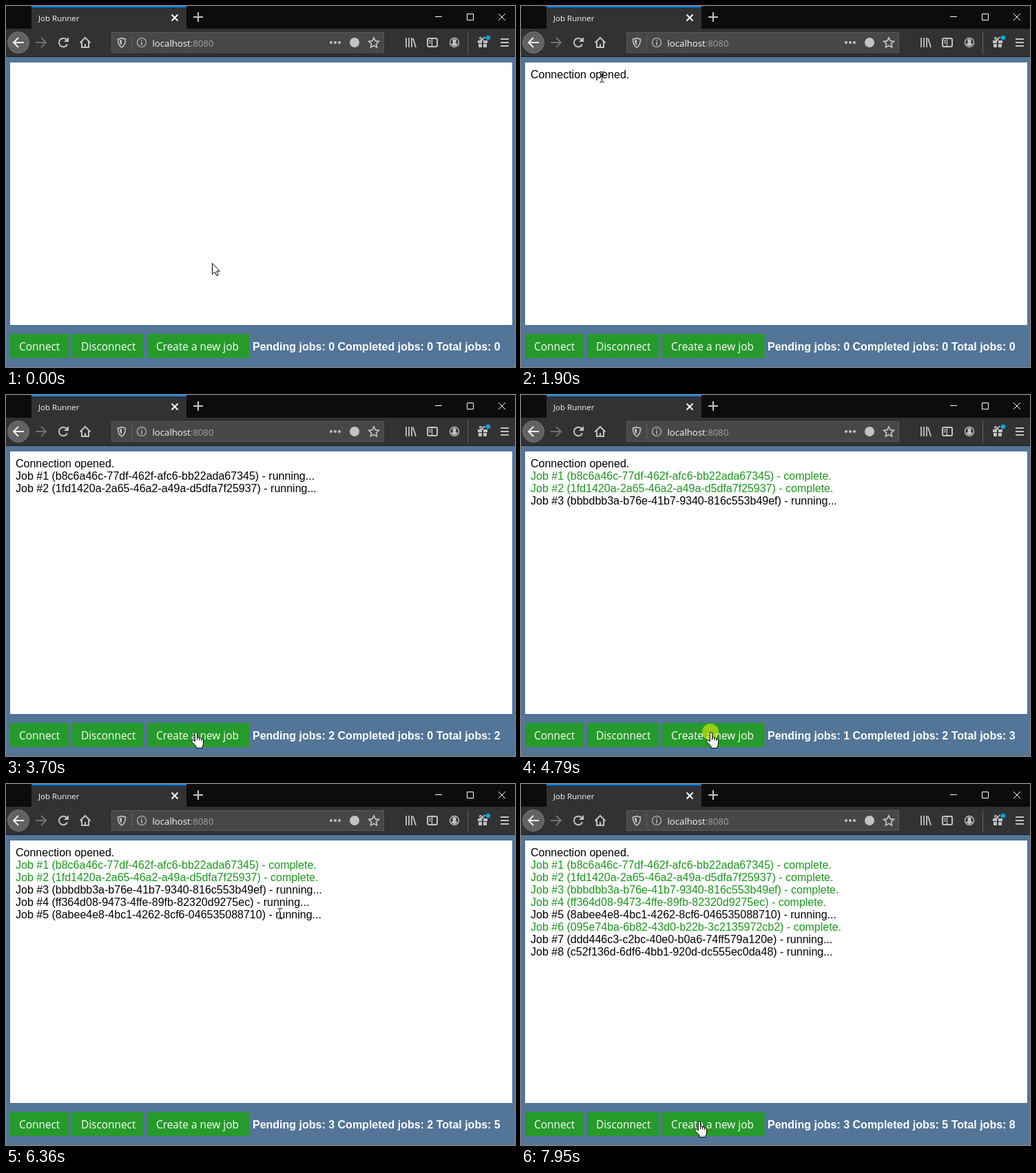
An HTML page for the animation above (8000 ms loop, 739 by 524 pixels).

```html
<!DOCTYPE html>
<html lang="en">
<head>
<meta charset="utf-8">
<title>Job Runner</title>
<style>
html, body { margin: 0; width: 100%; height: 100%; overflow: hidden; background: #537597; }
svg { display: block; }
text { white-space: pre; }
.ui { font-family: "Open Sans", "Noto Sans", sans-serif; fill: #f9f9fa; }
.page { font: 16px "Liberation Sans", Arial, sans-serif; }
.done { fill: #1a981c; }
.stats { font-weight: bold; fill: #fff; }
.buttons rect { fill: #269a2b; }
.buttons text { font-size: 15.4px; fill: #fff; }
.icons { fill: none; stroke: #c3c3c5; stroke-width: 2; }
.thin { stroke-width: 1; stroke: #fff; }
.solid { fill: #c3c3c5; stroke: none; }
#arrow path, #hand path { fill: #fff; stroke: #000; }
#beam { mix-blend-mode: difference; fill: none; stroke: #fff; }
</style>
</head>
<body>
<svg width="739" height="524" viewBox="0 0 739 524">
  <rect width="739" height="524" fill="#537597"/>
  <rect width="739" height="33" fill="#0c0c0d"/>
  <rect y="33" width="739" height="40" fill="#323234"/>
  <rect y="73" width="739" height="1" fill="#18181a"/>
  <rect x="37" width="225" height="33" fill="#323234"/>
  <rect x="37" width="225" height="2" fill="#0a84ff"/>
  <rect x="153.500" y="38.500" width="395" height="29" fill="#474749" stroke="#59595b"/>
  <circle cx="18" cy="53" r="15.500" fill="#626264" stroke="#747476"/>
  <text class="ui" x="47" y="22" font-size="11.5">Job Runner</text>
  <text class="ui" x="212.500" y="59" font-size="13.2">localhost<tspan fill="#a3a3a5">:8080</tspan></text>

  <g class="icons">
    <path d="M240.500 12.500l9 9m0-9l-9 9" stroke="#f9f9fa"/>
    <path d="M272 16h14M279 9v14"/>
    <path class="thin" d="M623 15.500h10M669.500 11.500h9v9h-9zM715 11l10 10m0-10l-10 10"/>
    <path d="M26 53H11m7-7l-7 7 7 7" stroke="#f0f0f1"/>
    <path d="M43 53h15m-7-7l7 7-7 7" stroke="#727274"/>
    <path d="M88.500 49.500A6.300 6.300 0 1 0 89 55.500"/>
    <path class="solid" d="M91 45v7h-7z"/>
    <path d="M107.500 53.500l7.500-7.500 7.500 7.500M110 52v8h10v-8M115 60v-5"/>
    <path d="M168 46.500q3 1.500 5.500 1.500 0 9-5.500 12-5.500-3-5.500-12 2.500 0 5.500-1.500z" stroke-width="1.600"/>
    <path class="solid" d="M168 49v8q-3-2-3-7z"/>
    <path d="M182.500 42v22M670.500 37v33" stroke="#5f5f61" stroke-width="1"/>
    <circle cx="197" cy="53" r="6.500" stroke-width="1.200"/>
    <path d="M197 52v5M197 49v1.500" stroke-width="1.500"/>
    <g class="solid">
      <circle cx="472" cy="53" r="2"/><circle cx="478" cy="53" r="2"/><circle cx="484" cy="53" r="2"/>
      <circle cx="506" cy="53" r="7"/>
    </g>
    <path d="M534 46l2.200 4.700 5.100.6-3.800 3.500 1 5.100-4.500-2.500-4.500 2.500 1-5.100-3.800-3.500 5.100-.6z" stroke-width="1.700"/>
    <path d="M581 46v14M585 46v14M589 46v14M591 47l4 13" stroke-width="1.800"/>
    <rect x="612" y="47" width="14" height="12" rx="2"/>
    <path d="M618.500 47v12M614 50.500h3M614 53.500h3" stroke-width="1.300"/>
    <circle cx="651" cy="53" r="6.500" stroke-width="1.400"/>
    <path class="solid" d="M651 48a2.700 2.700 0 0 1 1.500 5l3 2q-1.500 3-4.500 3t-4.500-3l3-2a2.700 2.700 0 0 1 1.500-5z"/>
    <path class="solid" d="M685 50h6v4h-6zM693 50h6v4h-6zM686 55h5v5h-5zM693 55h5v5h-5z"/>
    <path d="M692 50q-5-1-4-4 3-1 4 4 1-5 4-4" stroke-width="1.500"/>
    <circle cx="700" cy="46" r="3.300" fill="#00a4e8" stroke="none"/>
    <path d="M718 48h12M718 53h12M718 58h12"/>
  </g>

  <rect x="6" y="82" width="729" height="381" fill="#fff"/>
  <g class="page" id="log"></g>
  <g class="buttons">
    <rect x="6" y="476" width="85" height="35"/><text class="ui" x="19" y="500">Connect</text>
    <rect x="96" y="476" width="104" height="35"/><text class="ui" x="109" y="500">Disconnect</text>
    <rect x="205" y="476" width="148.500" height="35"/><text class="ui" x="218" y="500">Create a new job</text>
  </g>
  <text class="page stats" id="stats" x="358" y="500"></text>

  <circle id="ring" r="12" fill="#ff0" fill-opacity=".5"/>
  <g id="arrow"><path d="M.5 .5V16.500L4.300 13 6.800 18.500 9.200 17.500 6.800 12H11.500z"/></g>
  <g id="hand"><path d="M-.7 2.200a1.600 1.600 0 0 1 3.200 0V8q3-.8 3.200 1 2.600-.6 3 1 2.800-.4 2.800 2v5q0 2.500-1.500 4.500v2H1v-2.500L-5 14.500q-1-2.600 1-3 1.600 0 3.300 2.500zM2.500 8v4M5.700 9v3.500M8.700 10v3"/></g>
  <path id="beam" d="M-3 -7.500h2.500M.5 -7.500H3.500M-3 7.500h2.500M.5 7.500H3.500M0 -7V7"/>
</svg>
<script>
const LOOP = 8000, STEP = 80;
const $ = id => document.getElementById(id);

// [id, start, completion]
const jobs = [
  ["b8c6a46c-77df-462f-afc6-bb22ada67345", 3230, 4400],
  ["1fd1420a-2a65-46a2-a49a-d5dfa7f25937", 3700, 4400],
  ["bbbdbb3a-b76e-41b7-9340-816c553b49ef", 4400, 6520],
  ["ff364d08-9473-4ffe-89fb-82320d9275ec", 4870, 6910],
  ["8abee4e8-4bc1-4262-8cf6-046535088710", 5180, LOOP],
  ["095e74ba-6b82-43d0-b22b-3c2135972cb2", 7630, 7950],
  ["ddd446c3-c2bc-40e0-b0a6-74ff579a120e", 7790, LOOP],
  ["c52f136d-6df6-4bb1-920d-dc555ec0da48", 7950, LOOP]
];
const OPENED = 1270;
const clicks = [[1190, OPENED], [3150, 3230], [3620, 3700], [4320, 4400], [4790, 4870],
  [5020, 5180], [7550, 7630], [7710, 7790], [7870, 7950]];

// [start, steps, control x, control y, end x, end y]
const home = [299, 373];
const moves = [
  [80, 5, 130, 450, 25, 497],
  [560, 2, 28, 495, 31, 493],
  [1660, 4, 85, 300, 117, 103],
  [2290, 8, 46, 290, 275, 487],
  [3000, 1, 274, 488, 274, 489],
  [3150, 1, 275, 489, 275, 489],
  [5880, 7, 325, 350, 397, 188],
  [6830, 4, 375, 330, 282, 451],
  [7230, 3, 264, 478, 258, 489]
];
const buttons = [[6, 91], [96, 200], [205, 353]];

const rows = ["", ...jobs].map((_, i) => {
  const row = document.createElementNS("http://www.w3.org/2000/svg", "text");
  row.setAttribute("x", 14);
  row.setAttribute("y", 105 + 18 * i);
  return $("log").appendChild(row);
});

const ease = u => u * u * (3 - 2 * u);
const bezier = (a, b, c, u) => a * (1 - u) ** 2 + 2 * b * u * (1 - u) + c * u * u;

function pointer(t) {
  let [x, y] = home;
  for (const [start, steps, cx, cy, ex, ey] of moves) {
    if (t < start) break;
    const k = Math.min(steps, Math.floor((t - start) / STEP) + 1);
    const u = ease(k / steps);
    x = Math.round(bezier(x, cx, ex, u));
    y = Math.round(bezier(y, cy, ey, u));
  }
  return [x, y];
}

function place(id, x, y, shown) {
  $(id).setAttribute("transform", `translate(${x} ${y})`);
  $(id).style.display = shown ? "" : "none";
}

function draw(t) {
  rows[0].textContent = t >= OPENED ? "Connection opened." : "";
  let total = 0, completed = 0;
  jobs.forEach(([id, start, end], i) => {
    const begun = t >= start, done = t >= end;
    total += begun;
    completed += done;
    rows[i + 1].textContent = begun ? `Job #${i + 1} (${id}) - ${done ? "complete." : "running..."}` : "";
    rows[i + 1].setAttribute("class", done ? "done" : "");
  });
  $("stats").textContent =
    `Pending jobs: ${total - completed} Completed jobs: ${completed} Total jobs: ${total}`;

  const [x, y] = pointer(t);
  const lines = t >= OPENED ? total + 1 : 0;
  const onButton = y >= 476 && y < 511 && buttons.some(([l, r]) => x >= l && x < r);
  const onText = y >= 91 && y < 91 + 18 * lines && x < (y < 109 ? 157 : 458);
  place("hand", x, y, onButton);
  place("beam", x + .5, y, onText);
  place("arrow", x, y, !onButton && !onText);
  place("ring", x, y, clicks.some(([a, b]) => t >= a && t < b));
}

const origin = performance.now();
function tick() {
  draw((performance.now() - origin) % LOOP);
  requestAnimationFrame(tick);
}
tick();
</script>
</body>
</html>
```
